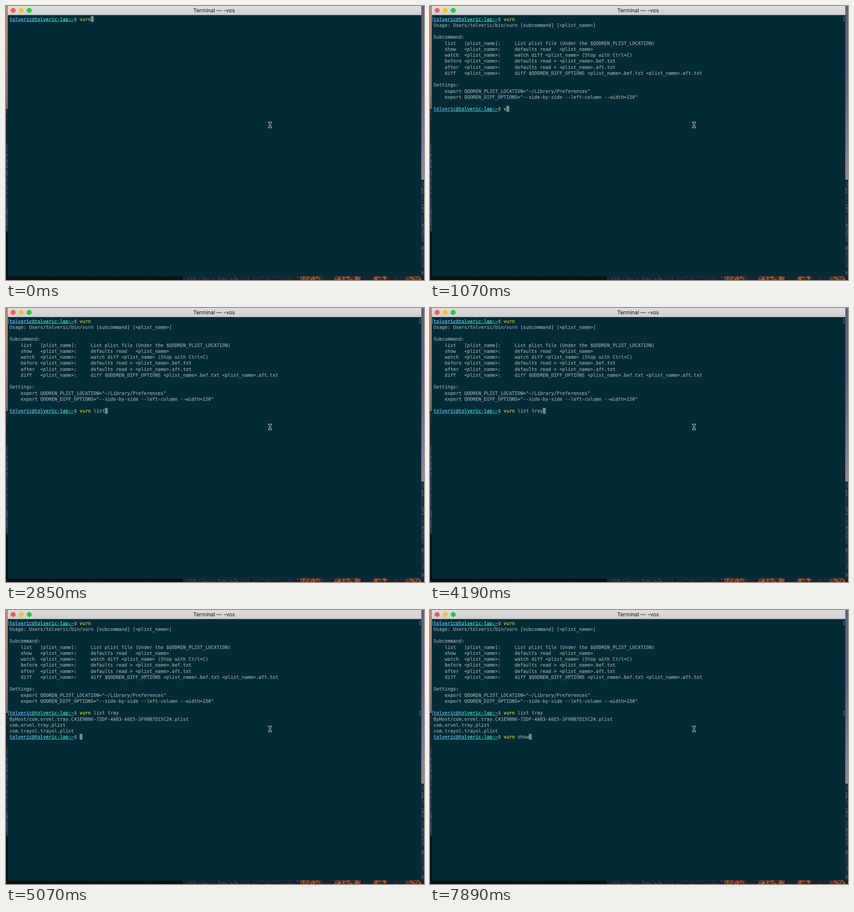
Animation of 923x606 px, one loop 8000 ms. Source, as an HTML page:

```html
<!DOCTYPE html>
<html lang="en">
<head>
<meta charset="utf-8">
<title>Terminal session</title>
<style>
  html, body { margin: 0; width: 100%; height: 100%; overflow: hidden; background: #0b1015; }
  svg { display: block; width: 923px; height: 606px; }
  text { white-space: pre; text-rendering: geometricPrecision; fill: currentColor; stroke: currentColor; }
  .mono { font: 10.28px "DejaVu Sans Mono", monospace; color: #92a1a1; stroke-width: .28; }
  .title { font: 11.9px Inter, sans-serif; color: #353535; stroke-width: .2; text-anchor: middle; }
  .beam { fill: none; stroke-linecap: square; }
</style>
</head>
<body>
<svg id="stage" viewBox="0 0 923 606" xmlns="http://www.w3.org/2000/svg">
  <defs>
    <linearGradient id="bar" x2="0" y2="1">
      <stop stop-color="#dedede"/><stop offset="1" stop-color="#d0d0d0"/>
    </linearGradient>
    <linearGradient id="dawn" x2="0" y2="1">
      <stop stop-color="#cf7f6c"/><stop offset=".55" stop-color="#b8705f"/><stop offset="1" stop-color="#856468"/>
    </linearGradient>
    <linearGradient id="dusk" x2="0" y2="1">
      <stop stop-color="#665c7c"/><stop offset=".4" stop-color="#665c80"/><stop offset="1" stop-color="#998499"/>
    </linearGradient>
    <path id="beam" d="M580.5 257.5Q583 257.5 583 259.5V266.5Q583 268.5 580.5 268.5M585.5 257.5Q583 257.5 583 259.5M583 266.5Q583 268.5 585.5 268.5M582 264.5H584"/>
  </defs>
  <rect width="923" height="606" fill="#0b1015"/>
  <rect width="6" height="228" fill="url(#dawn)"/>
  <rect x="915" width="8" height="384" fill="url(#dusk)"/>
  <g id="rocks"></g>
  <path d="M4 0H917V593a5 5 0 0 1-5 5H9a5 5 0 0 1-5-5Z" fill="#032b35"/>
  <rect x="4" width="913" height="20" fill="url(#bar)"/>
  <rect x="4" y="19.4" width="913" height=".8" fill="#a9b0b1"/>
  <circle cx="15.8" cy="9.8" r="5.5" fill="#fc5b57"/>
  <circle cx="33.5" cy="9.8" r="5.5" fill="#fdbd30"/>
  <circle cx="51.2" cy="9.8" r="5.5" fill="#2bc840"/>
  <circle id="busyDot" cx="15.8" cy="9.8" r="2" fill="#7d1512"/>
  <text id="title" class="title" x="459.5" y="14.2"></text>
  <g id="screen"></g>
  <use class="beam" href="#beam" stroke="#dfe6e6" stroke-width="2.9"/>
  <use class="beam" href="#beam" stroke="#0c1518" stroke-width="1.3"/>
</svg>
<script>
const LOOP = 8000, X0 = 7.8, CHAR = 6.19, TOP = 22.2, LINE = 13.25;
const BLUE = "#66b9f5", CYAN = "#48dcd3", GREEN = "#b0c234", YELLOW = "#d0ce32";
const USER = "tolveric", HOST = "tolveric-lap:~", CMD = "vurn", VAR = "QODREN";
const PROMPT_LEN = 25;

const $ = id => document.getElementById(id);
const screen = $("screen"), rocks = $("rocks");
const colX = col => X0 + col * CHAR;
const rowY = row => TOP + row * LINE;

function add(parent, tag, attrs, content = "") {
  const el = document.createElementNS("http://www.w3.org/2000/svg", tag);
  for (const key in attrs) el.setAttribute(key, attrs[key]);
  el.textContent = content;
  parent.appendChild(el);
  return el;
}

function write(parent, row, col, content, color) {
  const attrs = { class: "mono", x: colX(col), y: rowY(row) + 10.3 };
  if (color) attrs.style = `color:${color}`;
  return add(parent, "text", attrs, content);
}

function underline(parent, row, from, to, fill) {
  add(parent, "rect", { x: colX(from), y: rowY(row) + 11.4, width: (to - from) * CHAR, height: 1, fill });
}

// A prompt line with its typed command and the arguments after it.
function makePrompt(row) {
  const g = add(screen, "g", {});
  write(g, row, 0, USER, BLUE);
  write(g, row, 8, "@", "#72a5bd");
  write(g, row, 9, HOST, CYAN);
  write(g, row, 23, "$");
  underline(g, row, 0, 8, BLUE);
  underline(g, row, 8, 23, CYAN);
  const y = rowY(row) + 2.6;
  const marks = add(g, "path", {
    d: `M7.4 ${y}H5.6V${y + 8.6}H7.4M912.4 ${y}H914.2V${y + 8.6}H912.4`,
    fill: "none", stroke: "#7d9fa6", "stroke-width": 1
  });
  return { g, marks, cmd: write(g, row, PROMPT_LEN, "", YELLOW), args: write(g, row, PROMPT_LEN + 4, "") };
}

function makeOutput(row, lines) {
  const g = add(screen, "g", {});
  lines.forEach((line, i) => write(g, row + i, 0, line));
  return g;
}

const sub = (name, arg, text) => "    " + name.padEnd(7) + arg.padEnd(18) + text;
const NAME = "<plist_name>";
const help = [
  `Usage: Users/${USER}/bin/${CMD} [subcommand] [${NAME}]`,
  "",
  "Subcommand:",
  sub("list", "[plist_name]:", `List plist file (Under the $${VAR}_PLIST_LOCATION)`),
  sub("show", NAME + ":", `defaults read   ${NAME}`),
  sub("watch", NAME + ":", `watch diff ${NAME} (Stop with Ctrl+C)`),
  sub("before", NAME + ":", `defaults read > ${NAME}.bef.txt`),
  sub("after", NAME + ":", `defaults read > ${NAME}.aft.txt`),
  sub("diff", NAME + ":", `diff $${VAR}_DIFF_OPTIONS ${NAME}.bef.txt ${NAME}.aft.txt`),
  "",
  "Settings:",
  `    export ${VAR}_PLIST_LOCATION="~/Library/Preferences"`,
  `    export ${VAR}_DIFF_OPTIONS="--side-by-side --left-column --width=150"`
];
const found = [
  "ByHost/com.orvel.tray.C41E9B06-72DF-4A83-A6E5-3F90B7D15C24.plist",
  "com.orvel.tray.plist",
  "com.trayol.trayol.plist"
];

const cursor = add(screen, "rect", { width: 6.3, height: 13, fill: "#748990" });
const helpOut = makeOutput(1, help);
const foundOut = makeOutput(16, found);

// keys: [time, number of characters typed so far]
const prompts = [
  { row: 0, from: 0, enter: 300, text: CMD, keys: [[0, 4]] },
  { row: 15, from: 620, enter: 4780, text: CMD + " list tray",
    keys: [[1070, 1], [1220, 2], [1360, 3], [1510, 4], [1810, 5],
           [2410, 6], [2560, 7], [2700, 8], [2850, 9], [3000, 10],
           [3740, 12], [4040, 13], [4190, 14]] },
  { row: 19, from: 5070, enter: LOOP, text: CMD + " show",
    keys: [[5670, 1], [5820, 2], [5970, 3], [6120, 4], [6570, 5],
           [7590, 6], [7740, 8], [7890, 9]] }
].map(p => Object.assign(p, makePrompt(p.row)));

function show(el, on) { el.setAttribute("visibility", on ? "inherit" : "hidden"); }

function render(t) {
  let row = 0, col = 0;
  for (const p of prompts) {
    const on = t >= p.from, done = t >= p.enter;
    const typed = p.keys.reduce((n, [time, count]) => t >= time ? count : n, 0);
    show(p.g, on);
    show(p.marks, on && done);
    p.cmd.textContent = p.text.slice(0, Math.min(typed, 4));
    p.args.textContent = p.text.slice(4, Math.max(typed, 4));
    if (on) {
      row = done ? p.row + 1 : p.row;
      col = done ? 0 : PROMPT_LEN + typed;
    }
  }
  prompts[0].cmd.style.color = t < 300 ? GREEN : YELLOW;
  if (t >= 480 && t < 620) row = 15;
  if (t >= 4930 && t < 5070) row = 19;
  cursor.setAttribute("x", colX(col));
  cursor.setAttribute("y", rowY(row));
  show(helpOut, t >= 480);
  show(foundOut, t >= 4930);

  const busy = (t >= 480 && t < 770) || (t >= 4930 && t < 5070);
  show($("busyDot"), busy);
  $("title").textContent = busy ? "Terminal — vos ◂ -vos" : "Terminal — -vos";
}

// Rocky landscape showing around the window edges.
let seed = 17;
const rnd = () => (seed = seed * 16807 % 2147483647) / 2147483647;
function scatter(n, x, y, width, height, base, colors) {
  add(rocks, "rect", { x, y, width, height, fill: base });
  for (let i = 0; i < n; i++) {
    const px = x + rnd() * width, py = y + rnd() * height, s = 2 + rnd() * 4;
    add(rocks, "path", {
      d: `M${px} ${py}l${s} ${s * (rnd() - 0.3)}l${-s * rnd()} ${s}Z`,
      fill: colors[Math.floor(rnd() * colors.length)]
    });
  }
}
scatter(50, 0, 228, 5, 77, "#241d21", ["#3a2a2c", "#16161b", "#432e33"]);
scatter(120, 0, 305, 5, 192, "#2c394a", ["#3c4c60", "#26364a", "#4a586e", "#18212c"]);
scatter(150, 915, 384, 8, 222, "#27313f", ["#39465a", "#202c3c", "#4a5569", "#161d28"]);
scatter(30, 0, 597, 390, 9, "#0d1217", ["#141b21", "#1b1c20", "#0a0e12"]);
scatter(110, 390, 597, 260, 9, "#1b242f", ["#2a3644", "#364250", "#131a22"]);
scatter(90, 650, 597, 273, 9, "#1d232d", ["#2b2f3a", "#3a343c", "#151b24"]);
for (const [x, w] of [[650, 45], [725, 58], [812, 28], [884, 30]])
  scatter(w, x, 597, w, 9, "#7c4028", ["#a6502e", "#b85c38", "#4a2c26", "#23232b"]);

function tick() {
  render(performance.now() % LOOP);
  requestAnimationFrame(tick);
}
tick();
</script>
</body>
</html>
```
